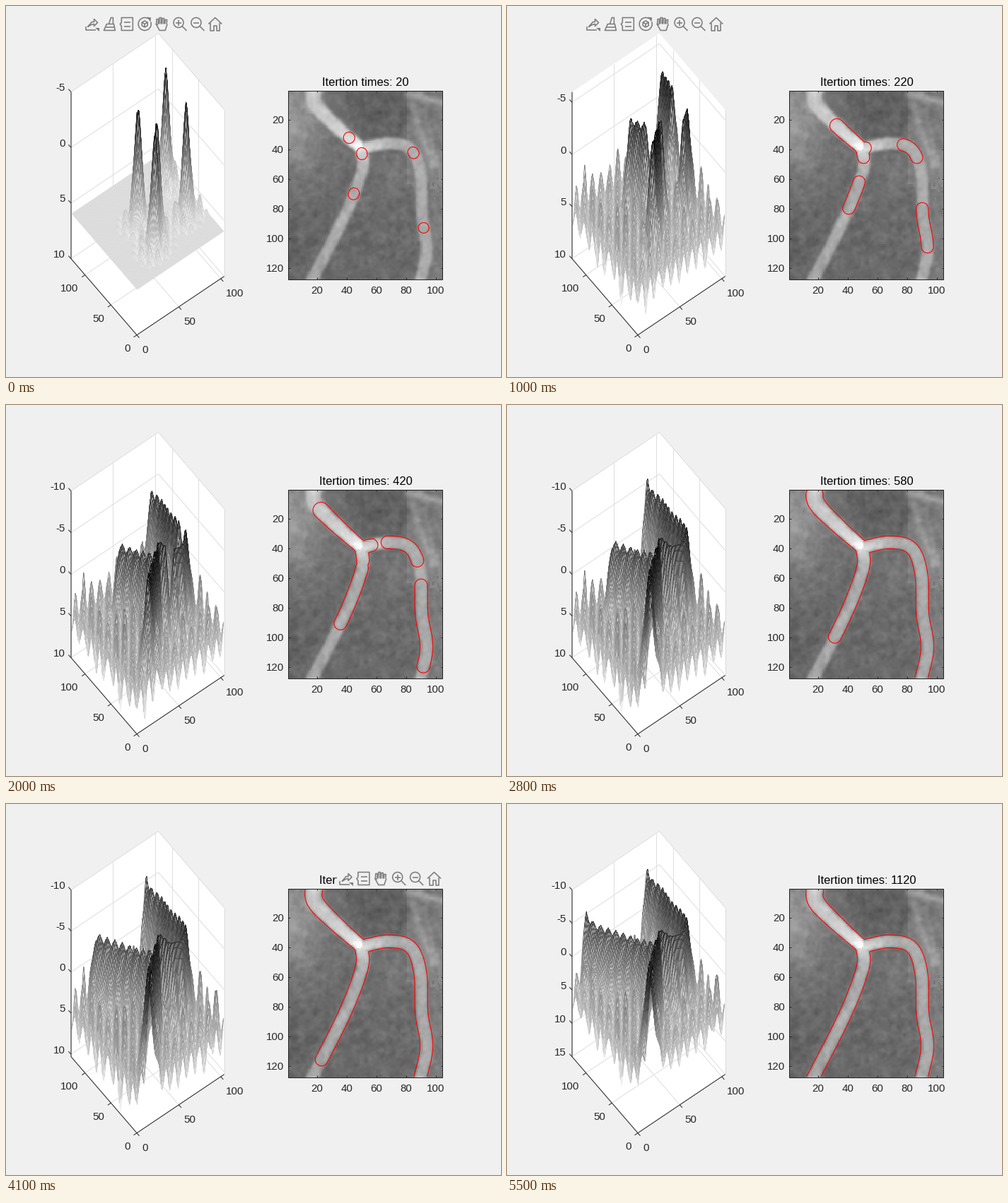
Write a matplotlib script that moves like this. It is 700x525 px and loops after 5600 ms.

```python
import numpy as np
import matplotlib.pyplot as plt
from matplotlib.animation import FuncAnimation
from matplotlib.collections import QuadMesh, LineCollection
from matplotlib.patches import Circle, Polygon, Rectangle, Arc

W, H, FRAMES, STEP = 700, 525, 56, 100
PT = 0.72                      # points per pixel at 100 dpi
BG, INK, GRID, ICON = "#f0f0f0", "#262626", "#dedede", "#7d7d7d"
COLS, ROWS = 104, 127

plt.rcParams["font.family"] = "Liberation Sans"
rng = np.random.default_rng(4)

# ---------- vessel tree: three smooth branches leaving one junction ----------
FORK = (49.8, 39.5)
# key points, widening per cell, fade length of the ridge height, brightness
BRANCHES = [
    ([FORK, (32, 23.6), (18.8, 9.5), (17.8, -2)], 0.03, 200, 0.78),
    ([FORK, (50, 54), (38.3, 85), (15.5, 130)], 0.0, 10, 0.66),
    ([FORK, (68, 36), (83, 40), (89.5, 57), (90.4, 84), (93.7, 107), (89, 130)], 0.0, 55, 0.67),
]
# growing pieces: branch, start along it, speed towards and away from the fork
PIECES = [(0, 11, 25, 12.2), (1, 3.5, 25, 2.5), (1, 31.5, 8, 10.6),
          (2, -2, 0, 4), (2, 37.5, 9, 3.2), (2, 89, 13, 12.5)]


def spline(pts, n=60):
    """Catmull-Rom curve through the points."""
    p = np.array(pts, float)
    p = np.vstack([2 * p[0] - p[1], p, 2 * p[-1] - p[-2]])
    u = np.linspace(0, 1, n, endpoint=False)[:, None]
    return np.vstack([b + (c - a) * u / 2 + (2 * a - 5 * b + 4 * c - d) * u ** 2 / 2
                      + (3 * b - a - 3 * c + d) * u ** 3 / 2
                      for a, b, c, d in zip(p, p[1:], p[2:], p[3:])])


parts = []
for b, (pts, widen, fade, glow) in enumerate(BRANCHES):
    p = spline(pts)
    cum = np.r_[0, np.cumsum(np.hypot(*np.diff(p, axis=0).T))]
    s = np.arange(0, cum[-1])
    parts.append(np.column_stack([
        np.full(s.size, b), s, np.interp(s, cum, p[:, 0]), np.interp(s, cum, p[:, 1]),
        4.35 + widen * s, 3.9 * np.exp(-s / fade), glow + 0.16 * np.exp(-s / 14)]))
branch, arc, cx, cy, rad, extra, light = np.vstack(parts).T

gx, gy = np.meshgrid(np.arange(1, COLS + 1), np.arange(1, ROWS + 1))
reach = (np.hypot(gx.reshape(-1, 1) - cx, gy.reshape(-1, 1) - cy) / rad).astype(np.float32)


def nearest(on):
    """Scaled distance to the active centreline, and the index of its closest point."""
    q = reach[:, on]
    i = q.argmin(1)
    dist = q[np.arange(len(q)), i]
    return dist.reshape(gx.shape), np.flatnonzero(on)[i].reshape(gx.shape)


def hill(x, y, wx, wy):
    return np.exp(-((gx - x) / wx) ** 2 - ((gy - y) / wy) ** 2)


def band(x0, y0, x1, y1, w):
    dx, dy = x1 - x0, y1 - y0
    k = np.clip(((gx - x0) * dx + (gy - y0) * dy) / (dx * dx + dy * dy), 0, 1)
    return np.exp(-((gx - x0 - k * dx) ** 2 + (gy - y0 - k * dy) ** 2) / w ** 2)


def noise(sd, rounds):
    a = rng.normal(0, 1, gx.shape)
    for _ in range(rounds):
        for axis in (0, 1):
            a = (np.roll(a, 1, axis) + 2 * a + np.roll(a, -1, axis)) / 4
    return sd * a / a.std()


def picture():
    q, i = nearest(branch >= 0)
    back = 0.42 + 0.17 * hill(0, 22, 26, 38) - 0.05 * hill(60, 8, 28, 20)
    back += 0.04 * hill(72, 55, 14, 14) + 0.07 * hill(104, 95, 14, 50) - 0.03 * hill(5, 100, 25, 30)
    back += 0.06 * ((gx > 80) & (gy < 65 + 3 * noise(1, 1)))
    back += 0.15 * band(81, 3, 104, 8, 2.5) + 0.1 * band(84, 10, 97, 52, 3) + 0.06 * band(92, 14, 103, 60, 2)
    vessel = 1 / (1 + np.exp((q - 0.88) * 8))
    img = back + (light[i] - back) * vessel + 0.08 * hill(*FORK, 6, 6)
    return np.clip(img + noise(0.012, 1) + noise(0.016, 6), 0, 1)


# ---------- level set surface ----------
ripple = np.cos(np.pi * gx / 5) * np.cos(np.pi * gy / 8) * np.clip(1 + noise(0.4, 30), 0.2, 2)
ridge_wave = np.cos(np.pi * gy / 4)
border = np.exp(-np.minimum(gy - 1, ROWS - gy) / 4)


def surface(t):
    """Height of the level set, and the distance field whose level 1 is its zero line."""
    run = t ** 1.1
    on = np.zeros(branch.size, bool)
    for b, start, back, ahead in PIECES:
        on |= (branch == b) & (arc >= start - back * run - 0.5) & (arc <= start + ahead * run + 0.5)
    q, i = nearest(on)
    early = min(t / 1.4, 1)
    q = q / (0.82 + 0.18 * early)

    base = 6 - 0.7 * early + np.clip((t - 4.1) / 1.4, 0, 1)
    grow = 1 - np.exp(-(t / 1.5) ** 1.5)
    depth = base + 4.4 - 0.9 * early + (extra[i] + 1.5 * border) * grow
    prof = np.exp(-np.log(depth / base) * q ** 1.6)
    amp = (1 + 1.9 * (1 - np.exp(-t / 1.1))) * np.clip((26 + 220 * t - 4 * q) / 12, 0, 1)
    z = base - depth * prof + amp * ripple * (1 - prof) ** 2
    z -= 0.45 * early * prof ** 3 * ridge_wave
    z -= 5 * np.clip((t - 3) / 1.5, 0, 1) * hill(97, 8, 3.2, 3.2)
    return np.where(q > 1.3, np.maximum(z, 0.4), z), q


def z_limits(k):
    top = -5 if k < 8 else -6 if k < 16 else -10
    floor = 10 if k < 38 else 10.3 if k < 45 else 15
    return top, floor


def project(x, y, w):
    """Orthographic view; w runs from 0 (top) to 1 (floor)."""
    u, v = x / COLS, y / ROWS
    return 185 + 123.5 * u - 93 * v, 465.6 - 83 * u - 108 * v - 236 * (1 - w)


# ---------- stage ----------
fig = plt.figure(figsize=(W / 100, H / 100), dpi=100, facecolor=BG)
ax = fig.add_axes([0, 0, 1, 1])
ax.axis("off")

IX0, IX1, IY0, IY1 = 399.2, 617.2, 119.7, 386.7
ax.imshow(picture(), cmap="gray", vmin=0, vmax=1, extent=(IX0, IX1, IY1, IY0),
          interpolation="nearest", aspect="auto", zorder=1)
ax.set_xlim(0, W)
ax.set_ylim(H, 0)


def to_px(x, y):
    return IX0 + (x - 0.5) * (IX1 - IX0) / COLS, IY0 + (y - 0.5) * (IY1 - IY0) / ROWS


def line(xs, ys, color=INK, width=1.0, z=3):
    return ax.plot(xs, ys, color=color, lw=width * PT, zorder=z, solid_capstyle="butt")[0]


def label(x, y, s, ha="center", size=15, color=INK, va="center_baseline"):
    return ax.text(x, y, s, ha=ha, va=va, fontsize=size * PT, color=color, zorder=4)


def segments(ends):
    return LineCollection([[project(*a), project(*b)] for a, b in ends],
                          colors=GRID, linewidths=PT, zorder=1.5)


# image axes
ax.add_patch(Rectangle((IX0, IY0), IX1 - IX0, IY1 - IY0, fill=False, ec=INK, lw=PT, zorder=3))
for v in range(20, 121, 20):
    x, y = to_px(v, v)
    if v <= 100:
        line([x, x], [IY1, IY1 - 2.5])
        line([x, x], [IY0, IY0 + 2.5])
        label(x - 0.4, 401.2, str(v))
    line([IX0, IX0 + 2.5], [y, y])
    line([IX1, IX1 - 2.5], [y, y])
    label(393, y, str(v), "right")

# box of the 3-D axes
shell = [(0, 0, 1), (COLS, 0, 1), (COLS, 0, 0), (COLS, ROWS, 0), (0, ROWS, 0), (0, ROWS, 1)]
ax.add_patch(Polygon([project(*p) for p in shell], fc="white", ec="none", zorder=1))
line(*zip(project(0, ROWS, 0), project(0, ROWS, 1), project(0, 0, 1), project(COLS, 0, 1)))
ends = []
for v in (0, 50, 100):
    ends += [((v, ROWS, 0), (v, ROWS, 1)), ((v, 0, 1), (v, ROWS, 1)),
             ((COLS, v, 0), (COLS, v, 1)), ((0, v, 1), (COLS, v, 1))]
    x, y = project(v, 0, 1)
    line([x, x + 3.5], [y, y + 4])
    label(x + 7, y + 19.7, str(v), "left")
    x, y = project(0, v, 1)
    line([x, x - 4.5], [y, y + 3])
    label(x - 9.5, y + 18, str(v), "right")
ax.add_collection(segments(ends), autolim=False)


# ---------- toolbars ----------
def icon(kind, x, y):
    out = []

    def stroke(*pts):
        px, py = zip(*pts)
        out.append(line([x + a for a in px], [y + b for b in py], ICON, 1.6, 7))

    def fill(*pts):
        out.append(ax.add_patch(Polygon([(x + a, y + b) for a, b in pts], fc=ICON, ec="none", zorder=7)))

    def arc_line(a, b, w, h, start=0, end=360):
        out.append(ax.add_patch(Arc((x + a, y + b), w, h, theta1=start, theta2=end,
                                    ec=ICON, lw=1.6 * PT, zorder=7)))

    if kind == "export":
        stroke((-9, 3), (-9, 8), (5, 8))
        stroke((-6, 4), (0, -3), (3, -3), (3, -7), (8, -2), (3, 3), (3, 0), (-1, 1), (-6, 4))
        fill((4, 5), (10, 5), (10, 10))
    elif kind == "brush":
        stroke((-1, 0), (2, -9), (5, -9), (5, 0))
        stroke((-4, 0), (6, 0), (8, 9), (-8, 9), (-4, 0))
        stroke((-5, 4), (7, 4))
    elif kind == "tip":
        stroke((-8, -2), (-8, -9), (8, -9), (8, 9), (-8, 9), (-8, 3), (-10, 0), (-8, -2))
        for b in (-3, 3):
            stroke((-4, b), (5, b))
    elif kind == "rotate":
        arc_line(0, 0, 18, 18, -20, 300)
        fill((3, -10), (9, -9), (8, -3))
        hexagon = [(4.6 * np.sin(a), 4.6 * np.cos(a)) for a in np.arange(7) * np.pi / 3]
        stroke(*hexagon)
        for n in (0, 2, 4):
            stroke((0, 0), hexagon[n])
    elif kind == "hand":
        for n, tip in enumerate((-6, -8, -9, -7)):
            a = 6 - 4 * n
            stroke((a, 0), (a + 0.5, tip), (a - 2, tip), (a - 2.5, 0))
        stroke((-6, 1), (-9, 0), (-4, 9), (4, 9), (7, 0))
    elif kind in ("in", "out"):
        arc_line(-2, -2, 14, 14)
        stroke((3, 3), (9.5, 9.5))
        stroke((-6, -2), (2, -2))
        if kind == "in":
            stroke((-2, -6), (-2, 2))
    elif kind == "home":
        stroke((-9.5, 0), (0, -9), (9.5, 0))
        stroke((-6.5, -2), (-6.5, 9), (-2, 9), (-2, 2), (2, 2), (2, 9), (6.5, 9), (6.5, -2))
    return out


def toolbar(kinds, x, y):
    return [a for n, kind in enumerate(kinds.split()) for a in icon(kind, x + 24.9 * n, y)]


left_bar = toolbar("export brush tip rotate hand in out home", 121.5, 25.5)
right_bar = toolbar("export tip hand in out home", 481, 105.5)
right_bar.append(ax.add_patch(Rectangle((468, 94), 150, 24.5, fc=BG, ec="none", zorder=6)))
hover = ax.add_patch(Circle((499, 244), 4, fc="#77775c", ec="white", lw=1.6 * PT, zorder=6))
title = label(508.7, 113, "", size=16.5, color="black", va="baseline")

img_x, img_y = to_px(gx, gy)
live = []


def update(k):
    for a in live:
        a.remove()
    live.clear()
    z, q = surface(k * STEP / 1000)
    z0, z1 = z_limits(k)

    ends = []
    for v in range(-10, 16, 5):
        if z0 <= v <= z1:
            w = (v - z0) / (z1 - z0)
            ends += [((0, ROWS, w), (COLS, ROWS, w)), ((COLS, ROWS, w), (COLS, 0, w))]
            x, y = project(0, ROWS, w)
            live.append(line([x, x - 3.7], [y, y - 4]))
            live.append(label(x - 8, y - 7, str(v), "right"))

    # painted from the far corner forward
    px, py = project(gx, gy, (z - z0) / (z1 - z0))
    tone = (z - z.min()) / np.ptp(z)
    tone = ((tone[1:, 1:] + tone[:-1, :-1]) / 2)[::-1, ::-1].ravel()
    rgba = np.column_stack([tone, tone, tone, np.ones_like(tone)])
    mesh = QuadMesh(np.dstack([px, py])[::-1, ::-1], facecolors="white",
                    edgecolors=rgba, linewidths=0.55, zorder=2)
    for c in (segments(ends), mesh):
        ax.add_collection(c, autolim=False)
        live.append(c)
    live.append(ax.contour(img_x, img_y, q, [1], colors="red", linewidths=0.8, zorder=2.5))

    title.set_text(f"Itertion times: {20 * (k + 1)}")
    for a in left_bar:
        a.set_visible(k < 13)
    for a in right_bar:
        a.set_visible(13 <= k < 20 or 29 <= k < 46)
    hover.set_visible(13 < k < 16)
    return []


anim = FuncAnimation(fig, update, frames=FRAMES, interval=STEP, init_func=lambda: [],
                     repeat=True, repeat_delay=0, blit=False)
plt.show()
```
